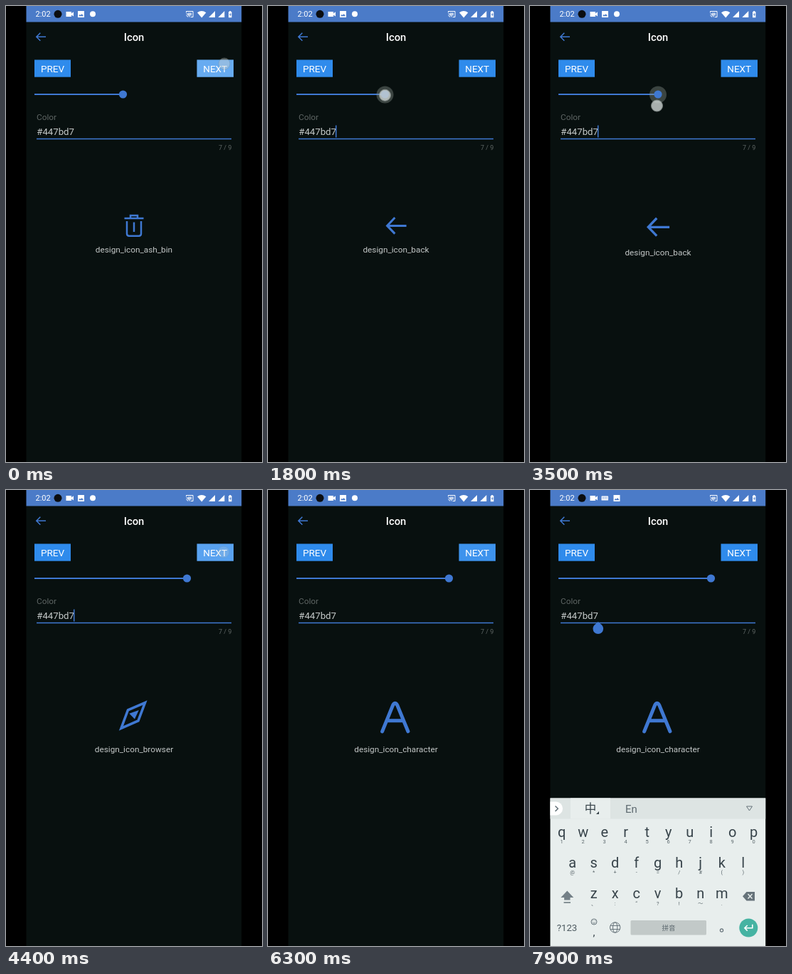
An HTML page for the animation above (8 s loop, 360x640 px).

```html
<!DOCTYPE html>
<html lang="en">
<head>
<meta charset="utf-8">
<title>Icon browser</title>
<style>
html, body { margin: 0; width: 100%; height: 100%; overflow: hidden; background: #000; }
svg { display: block; width: 360px; height: 640px; }
text { font-family: Roboto, "Noto Sans CJK SC", "Noto Sans CJK", sans-serif; white-space: pre; }
.mid { text-anchor: middle; }
.line { fill: none; stroke: #3f78d2; }
.key { font-size: 20px; fill: #37434a; text-anchor: middle; }
.hint { font-size: 7.5px; fill: #5c686d; text-anchor: middle; }
.grey { fill: none; stroke: #66737a; }
</style>
</head>
<body>
<svg viewBox="0 0 360 640">
  <defs><clipPath id="screen"><rect x="28.5" width="302.7" height="640"/></clipPath></defs>
  <rect width="360" height="640" fill="#000"/>
  <g clip-path="url(#screen)">
    <rect x="28" width="304" height="640" fill="#08100f"/>

    <rect x="28" width="304" height="22.5" fill="#4b7bc8"/>
    <g fill="#fff">
      <text x="41.5" y="15.2" font-size="11">2:02</text>
      <circle cx="73" cy="11.3" r="5.5" fill="#0b0d10"/>
      <path d="M84.5 8h7.5v2.4l3-2.2v6.4l-3-2.2V15h-7.5z"/>
      <g id="picture">
        <path fill-rule="evenodd" d="M-4.5 -4.5h9v9h-9zM-3.3 2.8h6.8l-2.3-3.2-1.7 2-1.2-1.3z"/>
      </g>
      <circle id="badge" cx="122" cy="11.3" r="4"/>
      <g id="keyIcon">
        <rect x="100.5" y="8.5" width="9.5" height="6" rx=".6"/>
        <path d="M101.5 10.3h7.5M101.5 12h7.5" stroke="#4b7bc8" stroke-width=".8" stroke-dasharray="1 .6"/>
      </g>
      <path d="M253.5 9.3V7.5h9.5v8h-3.3M253.5 11a4.5 4.5 0 0 1 4.5 4.5M253.5 13.4a2.1 2.1 0 0 1 2.1 2.1" fill="none" stroke="#fff"/>
      <rect x="255.5" y="9.5" width="5.5" height="4" opacity=".65"/>
      <path d="M269 9.3Q275.2 4.7 281.4 9.3L275.2 16.5z"/>
      <path d="M294 7v9h-9zM307.3 7v9h-9z"/>
      <path d="M313 8h1.2V7h2v1h1.2v8.3H313z"/>
      <path d="M315.6 9.2l-1.6 3.2h1.2v2.3l1.6-3.2h-1.2z" fill="#4b7bc8"/>
    </g>

    <path class="line" d="M56 43.3H43M48.3 37.8l-5.5 5.5 5.5 5.5" stroke-width="1.5"/>
    <text class="mid" x="180" y="49" font-size="14.8" font-weight="500" fill="#fff">Icon</text>

    <rect x="40" y="75.5" width="51" height="24.2" fill="#2f8bec"/>
    <rect x="268.5" y="75.5" width="51.5" height="24.2" fill="#2f8bec"/>
    <rect id="press" x="268.5" y="75.5" width="51.5" height="24.2" fill="#fff"/>
    <g class="mid" font-size="13.5" fill="#fff">
      <text x="65.5" y="92.6">PREV</text>
      <text x="294.2" y="92.6">NEXT</text>
    </g>

    <line id="track" class="line" x1="40" y1="124" y2="124" stroke-width="1.8"/>
    <circle id="halo" cy="124.6" r="12" fill="#8f9894" opacity=".38"/>
    <circle id="knob" cy="124" r="5.6" fill="#3f78d2"/>

    <text x="43" y="159.7" font-size="11.8" fill="#5f6665">Color</text>
    <text x="43.3" y="180.7" font-size="13.2" fill="#c6caca">#447bd7</text>
    <path class="line" d="M43 186.5H317" stroke-width="1.6"/>
    <line id="caret" class="line" x1="95.7" x2="95.7" y1="167.5" y2="184.5" stroke-width="1.5"/>
    <text x="317.3" y="202.2" font-size="9" text-anchor="end" fill="#5f6665">7 / 9</text>
    <path id="handle" d="M95.8 185l5.2 4.6a7.3 7.3 0 1 1-10.4 0z" fill="#3f78d2"/>

    <g id="icon"></g>
    <text id="label" class="mid" x="180" font-size="11.8" fill="#c3c7c7"></text>

    <g id="keyboard"></g>
    <circle id="touch" r="8" fill="#ccd3d1" stroke="#8f9996" stroke-width="1"/>
  </g>
</svg>
<script>
const LOOP = 8000, STEP = 100;
const el = id => document.getElementById(id);
const set = (id, attrs) => {
  for (const k in attrs) el(id).setAttribute(k, attrs[k]);
};
const show = (id, on) => set(id, { visibility: on ? "visible" : "hidden" });

// Piecewise value through [time, value] points, eased between them.
function track(t, points) {
  if (t <= points[0][0]) return points[0][1];
  for (let i = 1; i < points.length; i++) {
    const [a, v] = points[i - 1], [b, w] = points[i];
    if (t < b) {
      const u = (t - a) / (b - a);
      return v + (w - v) * u * u * (3 - 2 * u);
    }
  }
  return points[points.length - 1][1];
}

// Icons are drawn around 0,0 in a box 36 units wide.
const icons = {
  ash_bin: `<path class="line" stroke-width="2.5" d="M-13.5 -10H13.5M-5 -10V-14H5V-10M-10 -6V11.5Q-10 14.7 -6.8 14.7H6.8Q10 14.7 10 11.5V-6M0 -4.5V9"/>`,
  back: `<path class="line" stroke-width="3" d="M14.6 .4H-12M-1.6 -11L-12.4 .4L-1.6 11.6"/>`,
  browser: `<path class="line" stroke-width="2.2" d="M9.6 -12.7L3.7 3.1L-11.2 9.6L-5.3 -6.3z"/>
    <path fill="#3f78d2" d="M4.2 -6.2L-4.1 -3.2L.6 1.5z"/>`,
  character: `<path class="line" stroke-width="3.1" stroke-linecap="round" d="M-12 12.3L-2.8 -10.4Q-.8 -14 1.2 -10.4L10.5 12.3M-7.8 3H6.2"/>`
};

function keyRow(keys, hints, x, y) {
  return keys.map((k, i) => {
    const cx = x + 30 * i;
    return `<text class="key" x="${cx}" y="${y}">${k}</text>
      <text class="hint" x="${cx}" y="${y + 9.5}">${hints[i]}</text>`;
  }).join("");
}

el("keyboard").innerHTML = `
  <rect x="28" y="432.5" width="304" height="208" fill="#e8eeed"/>
  <rect x="28" y="432.5" width="304" height="29" fill="#dde4e3"/>
  <rect x="57" y="432.5" width="56" height="29" fill="#e8eeed"/>
  <path d="M28 437.5h8.5a9.5 9.5 0 0 1 0 19H28z" fill="#fff"/>
  <path class="grey" d="M35.5 443.5l3.8 3.7-3.8 3.7" stroke-width="1.5"/>
  <text class="mid" x="85" y="453" font-size="16.5" fill="#37434a">中</text>
  <path d="M97 451v4h-4z" fill="#37434a"/>
  <text class="mid" x="142.3" y="452.5" font-size="15" fill="#5d696f">En</text>
  <path class="grey" d="M304.5 444h8l-4 6z"/>
  ${keyRow([..."qwertyuiop"], [..."1234567890"], 44.7, 486.5)}
  ${keyRow([..."asdfghjkl"], [..."@*+-=/#()"], 59.7, 529.5)}
  ${keyRow([..."zxcvbnm"], ["、", ":", "“", "?", "!", "～", "."], 89.7, 573)}
  <path d="M52.3 562.5l9 9.5h-4.8v3.5h-8.4V572h-4.8z" fill="#748087"/>
  <path class="grey" d="M47.5 579h9.5" stroke-width="1.5"/>
  <path d="M299 570.2l5.5-6.2H316v12.4h-11.5z" fill="#66737a"/>
  <path d="M306.5 567l6 6.4M312.5 567l-6 6.4" stroke="#e8eeed" stroke-width="1.4"/>
  <text class="mid" x="52" y="619" font-size="13.3" fill="#4d5a60">?123</text>
  <circle class="grey" cx="90" cy="606" r="4"/>
  <path class="grey" d="M87.8 607q2.2 2.5 4.4 0M88.5 604.2v1M91.5 604.2v1" stroke-width=".9"/>
  <text class="mid" x="90" y="626" font-size="15" fill="#37434a">,</text>
  <g class="grey">
    <circle cx="119.7" cy="614" r="7.2"/>
    <ellipse cx="119.7" cy="614" rx="3.2" ry="7.2"/>
    <path d="M113 611.4h13.4M113 616.6h13.4"/>
  </g>
  <rect x="141.5" y="604" width="106.5" height="20.5" rx="1.5" fill="#c2c9c8"/>
  <text class="mid" x="195" y="617.8" font-size="9.5" fill="#5d696f">拼音</text>
  <circle cx="269.5" cy="618" r="2.1" class="grey" stroke-width="1.2"/>
  <circle cx="307.3" cy="614.5" r="13" fill="#45b3a2"/>
  <path d="M312.8 609.8v5h-10.5M305.7 611l-3.8 3.8 3.8 3.8" fill="none" stroke="#fff" stroke-width="1.6"/>`;

const drag = [[1800, 164.5], [2200, 215], [2500, 199], [2700, 202], [3100, 270], [3500, 180], [3800, 254.5]];
const pressing = [[100, .27], [700, 0], [4100, 0], [4300, .24], [4400, .2], [4800, 0], [5700, 0], [5900, .27], [6500, 0]];
const touching = [[100, .42], [400, 0], [1500, 0], [1700, .82], [3800, .82], [4000, 0], [4100, 0], [4200, .42],
  [4300, .42], [4500, 0], [5400, 0], [5500, .42], [5800, .42], [6100, 0], [6800, 0], [6900, .75], [7000, .75], [7200, 0]];
const dragY = [[1700, 125], [2500, 130], [3500, 140], [3900, 142]];

function touchAt(t, x) {
  if (t < 1000) return [307, 81];
  if (t < 4050) return [x - (t > 2500 ? 1.5 : 0), track(t, dragY)];
  if (t < 5000) return [306, 87];
  if (t < 6700) return [307, 86];
  return [150, 176];
}

function iconAt(t) {
  if (t < 200) return "ash_bin";
  if (t < 4300) return "back";
  return t < 5900 ? "browser" : "character";
}

function caretOn(t) {
  const start = t >= 5000 && t < 7000 ? 500 : 400;
  const p = t % 1000;
  return p >= start && p < start + 500;
}

let shown = "";
function draw(t) {
  const x = track(t, drag);
  set("track", { x2: x });
  set("knob", { cx: x });
  set("halo", { cx: x });
  show("halo", t >= 1700 && t < 3950);

  const size = 36 + (x - 164.5) * .2444;
  const name = iconAt(t);
  if (name !== shown) {
    el("icon").innerHTML = icons[name];
    el("label").textContent = "design_icon_" + name;
    shown = name;
  }
  set("icon", { transform: `translate(180 ${290 + size / 2}) scale(${size / 36})` });
  set("label", { y: 320.4 + size - 10 });

  set("press", { opacity: track(t, pressing) });
  const [tx, ty] = touchAt(t, x);
  set("touch", { cx: tx, cy: ty, opacity: track(t, touching) });
  show("caret", caretOn(t));
  show("handle", t >= 7100);

  const typing = t >= 7300;
  show("keyIcon", typing);
  show("badge", !typing);
  set("picture", { transform: `translate(${typing ? 122 : 105.5} 11.5)` });
  set("keyboard", { transform: `translate(0 ${track(t, [[7100, 208], [7500, 0]])})` });
  show("keyboard", t > 7100);
}

const began = performance.now();
function tick() {
  const t = (performance.now() - began) % LOOP;
  draw(Math.floor(t / STEP) * STEP);
  requestAnimationFrame(tick);
}
tick();
</script>
</body>
</html>
```
